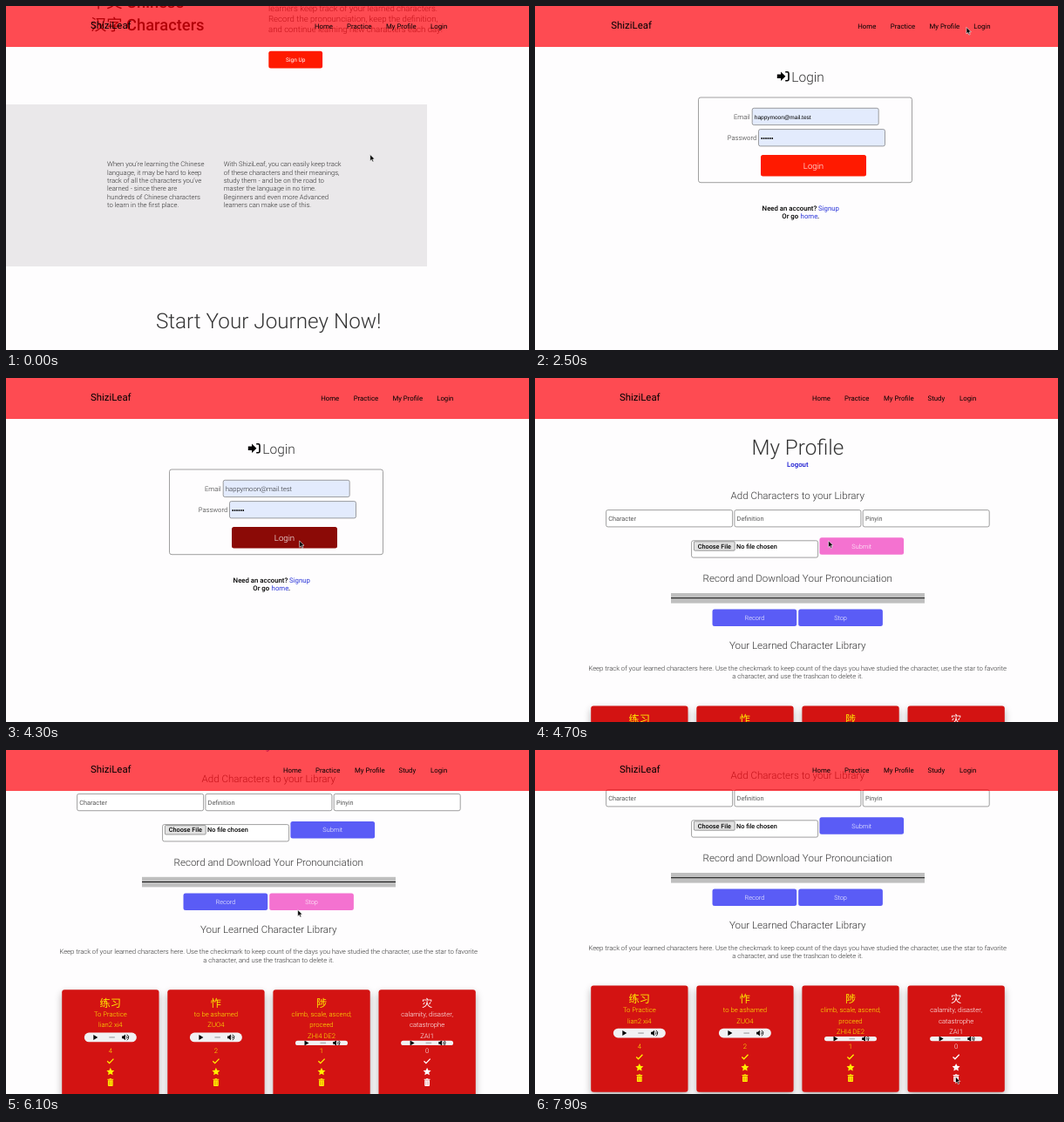
Write an HTML page with a canvas that moves like this. It is 600x395 px and loops after 8 s.

```html
<!DOCTYPE html>
<html lang="en">
<head>
<meta charset="utf-8">
<title>ShiziLeaf</title>
<style>
html, body { margin: 0; width: 100%; height: 100%; overflow: hidden; background: #fefdfe; }
canvas { display: block; width: 600px; height: 395px; }
</style>
</head>
<body>
<canvas id="stage"></canvas>
<script>
const W = 600, H = 395, LOOP = 8000;
const LOGIN_AT = 2450, RELAYOUT_AT = 3050, PROFILE_AT = 4500;
const BRAND = 'ShiziLeaf', EMAIL = 'happymoon@mail.test';
const BG = '#fefdfe', RED = '#ff1a00', BLUE = '#5a5cf6', PINK = '#f472d0', LINK = '#2a35d8', YELLOW = '#fff000';
const SANS = 'Roboto, "Noto Sans CJK SC", sans-serif';
const ARIAL = '"Liberation Sans", Arial, sans-serif';
const BODY = 7.7, LABEL = 7.8, SUB = 11.57;   // font sizes
const LEADING = 9.36;

const canvas = document.getElementById('stage');
const ctx = canvas.getContext('2d');
const dpr = window.devicePixelRatio || 1;
canvas.width = W * dpr;
canvas.height = H * dpr;

// ---- timing ----
const clamp = v => Math.max(0, Math.min(1, v));
const ease = p => p * p * (3 - 2 * p);

// keys: [time, ...values]; eased between neighbours
function track(keys, t) {
  if (t <= keys[0][0]) return keys[0].slice(1);
  for (let i = 1; i < keys.length; i++) {
    const a = keys[i - 1], b = keys[i];
    if (t <= b[0]) {
      const p = ease((t - a[0]) / (b[0] - a[0]));
      return a.slice(1).map((v, k) => v + (b[k + 1] - v) * p);
    }
  }
  return keys[keys.length - 1].slice(1);
}

const pointerKeys = [
  [600, 417.7, 170.5], [1100, 419, 165.6], [1500, 419, 165.6], [2150, 495, 24.5],
  [2500, 495, 24.5], [2680, 476, 24], [2900, 494.5, 24.5], [3300, 498, 24.5],
  [4050, 336.7, 187], [4900, 336.7, 187], [5300, 328, 182.8], [5600, 328, 182.8],
  [6100, 334.7, 183.5], [6350, 335, 183.5], [7600, 480, 372], [7850, 482.5, 375.2]
];
const homeScroll = [[550, 130], [1050, 0]];
const profileScroll = [[5550, 0], [6100, 101.2], [6350, 106]];

// underline that grows on hover and shrinks afterwards
const grow = (t, from, to) => Math.min(clamp((t - from) / 200), 1 - clamp((t - to) / 200));

// ---- drawing helpers ----
// light text is softened so that its thin strokes keep their weight
function text(s, x, y, size, { weight = 300, family = SANS, align = 'left', color } = {}) {
  ctx.font = `${weight} ${size}px ${family}`;
  ctx.textAlign = align;
  ctx.fillStyle = color || (weight < 400 ? 'rgba(0,0,0,.8)' : '#000');
  ctx.fillText(s, x, y);
}

function lines(list, x, y, step, size, o) {
  list.forEach((s, i) => text(s, x, y + i * step, size, o));
}

function box(x, y, w, h, r, fill, stroke) {
  ctx.beginPath();
  ctx.roundRect(x, y, w, h, r);
  if (fill) { ctx.fillStyle = fill; ctx.fill(); }
  if (stroke) { ctx.strokeStyle = stroke; ctx.lineWidth = 0.7; ctx.stroke(); }
}

function poly(points, fill) {
  ctx.beginPath();
  points.forEach(([x, y]) => ctx.lineTo(x, y));
  ctx.closePath();
  ctx.fillStyle = fill;
  ctx.fill();
}

function at(x, y, draw) {
  ctx.save();
  ctx.translate(x, y);
  draw();
  ctx.restore();
}

function button(label, x, y, w, h, size, fill, hoverFill, mouse) {
  const over = mouse && mouse[0] >= x && mouse[0] <= x + w && mouse[1] >= y && mouse[1] <= y + h;
  box(x, y, w, h, 2.5, over ? hoverFill : fill);
  text(label, x + w / 2, y + h / 2 + size * 0.36, size,
    { align: 'center', color: '#fff', weight: size < 7 ? 400 : 300 });
}

// ---- header ----
function header(logoX, items, lineOf) {
  ctx.fillStyle = 'rgba(255,0,10,.7)';
  ctx.fillRect(0, 0, W, 47);
  text(BRAND, logoX, 26.1, 11.4, { weight: 400 });
  for (const [label, x] of items) {
    text(label, x, 25.5, LABEL, { weight: 400 });
    const part = lineOf[label] || 0;
    if (part > 0) ctx.fillRect(x, 26.6, ctx.measureText(label).width * part, 1);
  }
}

// ---- home ----
function home(t) {
  ctx.save();
  ctx.translate(0, -track(homeScroll, t)[0]);
  lines(['练习 Practice', '中文 Chinese', '汉字 Characters'], 97, 106, 25.9, 18.3, { weight: 500 });
  text('THE EASY WAY', 301.3, 97.3, 12.1, { weight: 700 });
  lines([BRAND + ' is here to help Chinese language',
    'learners keep track of your learned characters.',
    'Record the pronounciation, keep the definition,',
    'and continue learning new characters each day!'], 301, 124.6, 11.7, 9.64);
  button('Sign Up', 301.3, 181.8, 61.8, 19.8, 6.5, RED);
  ctx.fillStyle = '#eae8ea';
  ctx.fillRect(0, 243, 483, 186);
  lines(['When you’re learning the Chinese', 'language, it may be hard to keep',
    'track of all the characters you’ve', 'learned - since there are',
    'hundreds of Chinese characters', 'to learn in the first place.'], 116, 314.2, LEADING, BODY);
  lines(['With ' + BRAND + ', you can easily keep track',
    'of these characters and their meanings,', 'study them - and be on the road to',
    'master the language in no time.', 'Beginners and even more Advanced',
    'learners can make use of this.'], 249.7, 314.2, LEADING, BODY);
  text('Start Your Journey Now!', 301.2, 500.4, 24.25, { align: 'center' });
  ctx.restore();
  header(97, [['Home', 354], ['Practice', 391], ['My Profile', 436], ['Login', 487]],
    { Login: grow(t, 2100, LOOP) });
}

// ---- login ----
function signInIcon() {
  poly([[0, 3.8], [4.2, 3.8], [4.2, 0.8], [9.6, 6], [4.2, 11.2], [4.2, 8.2], [0, 8.2]], '#000');
  ctx.beginPath();
  ctx.moveTo(9.4, 1);
  ctx.lineTo(11.6, 1);
  ctx.quadraticCurveTo(13.2, 1, 13.2, 2.6);
  ctx.lineTo(13.2, 9.4);
  ctx.quadraticCurveTo(13.2, 11, 11.6, 11);
  ctx.lineTo(9.4, 11);
  ctx.strokeStyle = '#000';
  ctx.lineWidth = 1.6;
  ctx.stroke();
}

function login(t, mouse) {
  at(277.8, 74.8, signInIcon);
  text('Login', 294.3, 86.6, 15.5);
  box(187.5, 105, 245, 97.7, 2.5, null, '#777');
  text('Email', 228, 130, BODY);
  text('Password', 220.7, 154.2, BODY);
  box(249.2, 117.3, 145, 19.3, 2, '#e3ebfd', '#777');
  box(256.5, 141.6, 145, 19.3, 2, '#e3ebfd', '#777');
  if (t < 4150) text(EMAIL, 251.8, 129.8, 6.5, { family: ARIAL, weight: 400 });
  else text(EMAIL, 251.8, 130, BODY);
  ctx.fillStyle = '#000';
  for (let i = 0; i < 6; i++) {
    ctx.beginPath();
    ctx.arc(260.2 + i * 2.4, 152, 0.9, 0, 7);
    ctx.fill();
  }
  button('Login', 259, 171, 121, 24.4, 9.64, RED, '#8b0a06', mouse);
  text('Need an account?', 260.6, 234.7, LABEL, { weight: 500 });
  text('Signup', 325, 234.7, LABEL, { weight: 400, color: LINK });
  text('Or go', 283.3, 244, LABEL, { weight: 500 });
  text('home', 304.6, 244, LABEL, { weight: 400, color: LINK });
  text('.', 324, 244, LABEL, { weight: 500 });

  const wide = t < RELAYOUT_AT;
  const xs = wide ? [370.3, 407.8, 452.5, 503.3] : [361.2, 398.7, 443.4, 494.2];
  header(wide ? 87.3 : 97, ['Home', 'Practice', 'My Profile', 'Login'].map((s, i) => [s, xs[i]]),
    { 'My Profile': grow(t, 2560, 2780), Login: grow(t, 3060, 3450) });

  if (t > 2600 && t < 3350) {
    box(-1, 387.3, 67, 9, [0, 2, 0, 0], '#858585', '#666');
    text('localhost:8003/profile', 0.5, 394.4, 6.5, { family: ARIAL, weight: 400 });
  }
}

// ---- profile ----
const cards = [
  ['练习', ['To Practice', 'lian2 xi4'], '4', YELLOW],
  ['怍', ['to be ashamed', 'ZUO4'], '2', YELLOW],
  ['陟', ['climb, scale, ascend;', 'proceed', 'ZHI4 DE2'], '1', YELLOW],
  ['灾', ['calamity, disaster,', 'catastrophe', 'ZAI1'], '0', '#fff']
];

function player(h) {
  ctx.save();
  box(-30, -h / 2, 60, h, h / 2, '#f1f1f3');
  ctx.clip();
  poly([[-19.5, -3], [-19.5, 3], [-14.5, 0]], '#000');
  ctx.fillStyle = '#b5b5b8';
  ctx.fillRect(-1.5, -0.8, 6.5, 1.6);
  poly([[13.2, -1.3], [14.8, -1.3], [17, -3.3], [17, 3.3], [14.8, 1.3], [13.2, 1.3]], '#000');
  ctx.strokeStyle = '#000';
  ctx.lineWidth = 0.9;
  for (const r of [1.8, 3.6]) {
    ctx.beginPath();
    ctx.arc(17.3, 0, r, -1.1, 1.1);
    ctx.stroke();
  }
  ctx.restore();
}

function check(color) {
  ctx.beginPath();
  ctx.moveTo(-3.6, 0.3);
  ctx.lineTo(-1.2, 2.6);
  ctx.lineTo(3.6, -2.4);
  ctx.strokeStyle = color;
  ctx.lineWidth = 1.3;
  ctx.stroke();
}

function star(color) {
  const points = [];
  for (let i = 0; i < 10; i++) {
    const a = i * Math.PI / 5 - Math.PI / 2, r = i % 2 ? 2.3 : 4.7;
    points.push([r * Math.cos(a), r * Math.sin(a) + 0.3]);
  }
  poly(points, color);
}

function trash(color) {
  ctx.fillStyle = color;
  ctx.fillRect(-3.4, -3.8, 6.8, 1);
  ctx.fillRect(-1.2, -4.4, 2.4, 0.8);
  box(-2.9, -2.3, 5.8, 6.6, [0, 0, 0.9, 0.9], color);
  ctx.fillStyle = 'rgba(209,19,18,.55)';
  for (const x of [-1.6, 0, 1.6]) ctx.fillRect(x - 0.25, -1.2, 0.5, 4.4);
}

function card([glyphs, words, count, color], i) {
  const x = 64.2 + i * 121.1, mid = 55.6, top = 376.4;
  at(x, top, () => {
    ctx.save();
    ctx.shadowColor = 'rgba(0,0,0,.3)';
    ctx.shadowBlur = 8 * dpr;
    ctx.shadowOffsetY = 4 * dpr;
    box(0, 0, 111.3, 122.4, 3, '#d31312');
    ctx.restore();
    const o = { align: 'center', color };
    text(glyphs, mid, 19.8, 12.2, { ...o, weight: 500 });
    lines(words, mid, 30.8, 12.3, BODY, o);
    const tall = words.length < 3;
    at(mid, tall ? 54.7 : 61.2, () => player(tall ? 10.6 : 5.2));
    text(count, mid, 72.4, BODY, o);
    at(mid, 81.8, () => check(color));
    at(mid, 94, () => star(color));
    at(mid, 106.4, () => trash(color));
  });
}

function profile(t, mouse) {
  const scroll = track(profileScroll, t)[0];
  const m = [mouse[0], mouse[1] + scroll];
  const mid = { align: 'center' };
  ctx.save();
  ctx.translate(0, -scroll);
  text('My Profile', 301.4, 88.3, 24.25, mid);
  text('Logout', 301.3, 101.6, LABEL, { align: 'center', weight: 500, color: '#1414d0' });
  text('Add Characters to your Library', 301.3, 138.6, SUB, mid);
  ['Character', 'Definition', 'Pinyin'].forEach((s, i) => {
    const x = 81.6 + i * 147.3;
    box(x, 151.6, 145, 19.3, 2, '#fff', '#777');
    text(s, x + 2.7, 163.9, 7.3, { weight: 400, color: '#555' });
  });
  box(179.6, 186.8, 145, 19.3, 2, '#fff', '#777');
  box(182.4, 187.8, 46.8, 10.4, 1, '#e2e2e2', '#777');
  text('Choose File', 205.8, 195.6, 7.3, { align: 'center', weight: 500 });
  text('No file chosen', 231, 195.6, 7.3, { weight: 500 });
  button('Submit', 326.4, 183.2, 96.7, 19.5, 7.3, BLUE, PINK, m);
  text('Record and Download Your Pronounciation', 301.2, 234.2, SUB, mid);
  ctx.fillStyle = '#bfbfbf';
  ctx.fillRect(156, 247, 291, 11.6);
  ctx.fillStyle = '#111';
  ctx.fillRect(156, 252.2, 291, 1);
  button('Record', 203.5, 265.6, 96.7, 19.5, 7.3, BLUE, PINK, m);
  button('Stop', 302.2, 265.6, 96.7, 19.5, 7.3, BLUE, PINK, m);
  text('Your Learned Character Library', 301.2, 310.9, SUB, mid);
  lines(['Keep track of your learned characters here. Use the checkmark to keep count of the days ' +
    'you have studied the character, use the star to favorite',
    'a character, and use the trashcan to delete it.'], 301.2, 335.5, LEADING, BODY, mid);
  cards.forEach(card);
  ctx.restore();
  header(97, [['Home', 318], ['Practice', 355], ['My Profile', 400], ['Study', 450.5], ['Login', 487]], {});
}

// ---- pointer ----
function arrow() {
  const shape = [[0, 0], [0, 7.4], [1.7, 5.9], [2.9, 8.6], [4.2, 8], [3, 5.4], [5.3, 5.3]];
  poly(shape, '#000');
  ctx.strokeStyle = '#fff';
  ctx.lineWidth = 0.6;
  ctx.stroke();
}

function beam() {
  ctx.strokeStyle = '#222';
  ctx.lineWidth = 0.8;
  ctx.beginPath();
  ctx.moveTo(-1.6, -3.6);
  ctx.quadraticCurveTo(0, -3.6, 0, -2.4);
  ctx.quadraticCurveTo(0, -3.6, 1.6, -3.6);
  ctx.moveTo(0, -2.4);
  ctx.lineTo(0, 3.4);
  ctx.moveTo(-1.6, 4.6);
  ctx.quadraticCurveTo(0, 4.6, 0, 3.4);
  ctx.quadraticCurveTo(0, 4.6, 1.6, 4.6);
  ctx.moveTo(-1, 1.8);
  ctx.lineTo(1, 1.8);
  ctx.stroke();
}

function render(t) {
  ctx.setTransform(dpr, 0, 0, dpr, 0, 0);
  ctx.textRendering = 'geometricPrecision';
  ctx.fillStyle = BG;
  ctx.fillRect(0, 0, W, H);
  const mouse = track(pointerKeys, t);
  if (t < LOGIN_AT) home(t);
  else if (t < PROFILE_AT) login(t, mouse);
  else profile(t, mouse);
  at(mouse[0], mouse[1], t > 5250 && t < 5600 ? beam : arrow);
}

const start = performance.now();
function tick() {
  render((performance.now() - start) % LOOP);
  requestAnimationFrame(tick);
}
tick();
</script>
</body>
</html>
```
